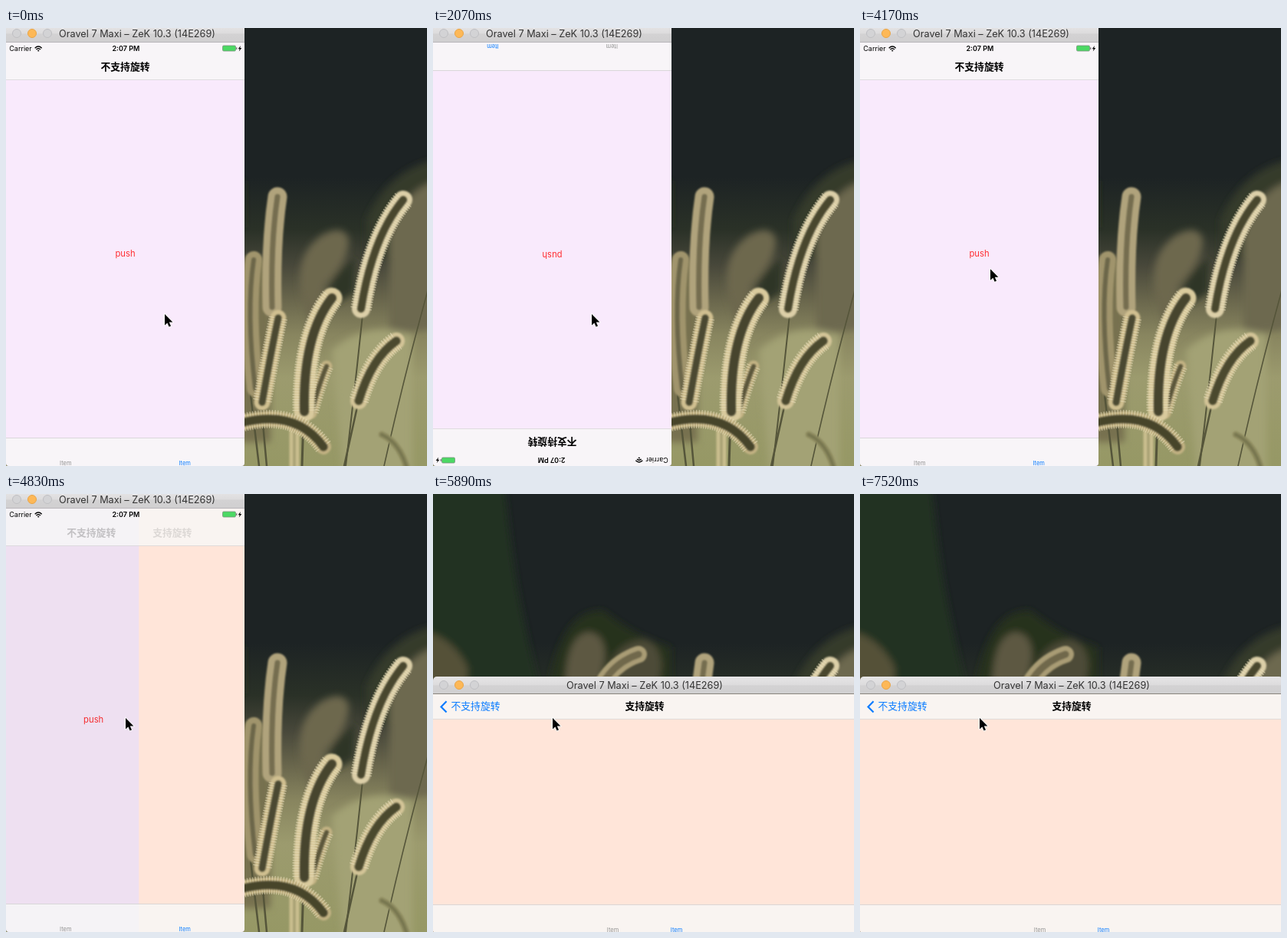
Animation of 549 by 571 pixels, one loop 8000 ms. Source, as an HTML page:

```html
<!DOCTYPE html>
<html lang="zh-CN">
<head>
<meta charset="utf-8">
<title>Rotation demo</title>
<style>
html, body { margin: 0; width: 100%; height: 100%; overflow: hidden; background: #1d2324; }
#stage { position: absolute; left: 0; top: 0; width: 549px; height: 571px; overflow: hidden;
  font-family: Inter, "Noto Sans CJK SC", "Noto Sans CJK", sans-serif; }
#stage * { position: absolute; box-sizing: border-box; white-space: nowrap; }
#wall, #cursor { left: 0; top: 0; overflow: visible; }
#wall *, #stage svg * { position: static; }
#win { left: 0; overflow: hidden; border-radius: 5px 5px 4px 4px; }
#bar { left: 0; top: 0; width: 100%; height: 23px; border-bottom: 1px solid;
  background: linear-gradient(#e6e5e6, #dddcdd 48%, #d3d2d3 54%, #d0cfd0); }
#bar i { top: 5px; width: 12px; height: 12px; border-radius: 50%; background: #d3d3d5; border: 1px solid #bfbfc2; }
#bar i.on { background: #fdb857; border-color: #e9a445; }
#name { top: 11.5px; font-size: 12.7px; color: #333; }
#screen { left: 0; top: 23px; overflow: hidden; background: #000; }
.view { left: 0; top: 0; width: 100%; height: 100%; }
#first { background: #f9eafc; }
#second { background: #ffe5d9; }
#shade { left: 0; top: 0; width: 100%; height: 100%; background: #000; }
.mid { transform: translate(-50%, -50%); line-height: 1.2; }
#push { left: 50%; top: 276px; font-size: 11.25px; color: #ff2f32; }
.chrome { left: 0; width: 100%; background: rgba(248, 248, 248, .8); }
#nav { top: 0; border-bottom: 1px solid rgba(0, 0, 0, .1); }
#tabs { bottom: 0; height: 37px; border-top: 1px solid rgba(0, 0, 0, .12); }
#tabs .mid { top: 31.5px; font-size: 7.5px; color: #929292; }
#tabs .sel { color: #0a7cff; }
.head { font-size: 12.8px; font-weight: 600; color: #000; }
#back { font-size: 12.8px; color: #0a7cff; }
#status { left: 0; top: 0; width: 100%; height: 15px; font-size: 9px; color: #000; }
</style>
</head>
<body>
<div id="stage">
  <svg id="wall" width="549" height="571" viewBox="0 0 549 571">
    <defs>
      <linearGradient id="dusk" x1="0" y1="0" x2="0" y2="571" gradientUnits="userSpaceOnUse">
        <stop offset=".34" stop-color="#1d2324"/>
        <stop offset=".46" stop-color="#2a3127"/>
        <stop offset=".54" stop-color="#47473a"/>
        <stop offset=".62" stop-color="#69664c"/>
        <stop offset=".7" stop-color="#88855f"/>
        <stop offset=".8" stop-color="#9c9b6e"/>
        <stop offset="1" stop-color="#969865"/>
      </linearGradient>
      <filter id="soft" filterUnits="userSpaceOnUse" x="-30" y="-30" width="610" height="632"><feGaussianBlur stdDeviation="5"/></filter>
      <filter id="fuzz" filterUnits="userSpaceOnUse" x="-30" y="-30" width="610" height="632"><feGaussianBlur stdDeviation="1.2"/></filter>
    </defs>
    <rect width="549" height="571" fill="url(#dusk)"/>
    <g id="blobs" filter="url(#soft)"></g>
    <g id="grass" fill="none" stroke-linecap="round"></g>
  </svg>

  <div id="win">
    <div id="bar">
      <i style="left:8px"></i><i class="on" style="left:28px"></i><i style="left:48px"></i>
      <span id="name" class="mid">Oravel 7 Maxi – ZeK 10.3 (14E269)</span>
    </div>
    <div id="screen">
      <div id="phone">
        <div id="first" class="view"><span id="push" class="mid">push</span><div id="shade"></div></div>
        <div id="second" class="view"></div>
        <div id="nav" class="chrome">
          <span id="title1" class="head mid">不支持旋转</span>
          <span id="title2" class="head mid">支持旋转</span>
          <svg id="chev" width="10" height="17" style="left:9px"><path d="M8.6 1.2L1.6 8.4l7 7.2" fill="none" stroke="#0a7cff" stroke-width="2.2"/></svg>
          <span id="back" class="mid">不支持旋转</span>
        </div>
        <div id="status">
          <span class="mid" style="left:19px;top:8px">Carrier</span>
          <svg width="11" height="9" style="left:37px;top:3.5px" fill="none" stroke="#000" stroke-width="1.3">
            <path d="M.7 3.2Q5.2-1.2 9.7 3.2M2.4 5Q5.2 2.4 8 5"/><path d="M3.8 6.3Q5.2 5.2 6.6 6.3L5.2 7.8Z" fill="#000" stroke="none"/>
          </svg>
          <b id="clock" class="mid" style="left:50.3%;top:8px;font-weight:600"></b>
          <svg width="28" height="10" style="left:281.5px;top:3px">
            <rect x=".5" y="1" width="17" height="7" rx="1.4" fill="#4cd964" stroke="#77917b" stroke-width=".8"/>
            <path d="M18.8 3.3v2.6" stroke="#555"/><path d="M24 1L20.7 5.2h2L21.8 8.5 25.3 4h-2.1Z" fill="#000"/>
          </svg>
        </div>
        <div id="tabs" class="chrome">
          <span id="tab1" class="mid">Item</span><span id="tab2" class="mid sel">Item</span>
        </div>
      </div>
    </div>
  </div>

  <svg id="cursor" width="14" height="20">
    <path d="M0 0V14.5L3.4 11.4 5.6 16.6 8 15.6 5.8 10.6H10.4Z" fill="#000" stroke="#fff" stroke-width="1.4" paint-order="stroke"/>
  </svg>
</div>

<script>
const $ = id => document.getElementById(id);
const NS = 'http://www.w3.org/2000/svg';
const SHORT = 311, LONG = 552, LOOP = 8000;

function draw(parent, d, attrs) {
  const p = document.createElementNS(NS, 'path');
  p.setAttribute('d', d);
  for (const k in attrs) p.setAttribute(k, attrs[k]);
  $(parent).append(p);
}

// Out-of-focus background
[
  ['M-20-20H92Q100 60 108 110T140 260H-20Z', '#243021'],
  ['M150 260Q165 150 222 152Q262 185 310 200V260Z', '#28321f'],
  ['M172 260Q172 182 204 180Q226 184 224 215L215 260Z', '#5d5942'],
  ['M220 260Q230 190 278 190Q310 205 290 260Z', '#4d4b37'],
  ['M-20 178Q22 182 45 225V260H-20Z', '#545139'],
  ['M470 250Q500 180 570 170V300H470Z', '#343a2a'],
  ['M500 270Q520 205 570 198V390L500 400Z', '#6d6950'],
  ['M385 350Q375 295 412 270Q440 255 447 275Q448 305 415 335L400 400Z', '#6d684e'],
  ['M418 345Q430 315 455 300V345L430 360Z', '#2d3526'],
  ['M300 300H345V540H300Z', '#77714f'],
  ['M425 420Q470 380 530 400V590H440Z', '#a3a274']
].forEach(([d, fill]) => draw('blobs', d, { fill }));

// Stems
[
  ['M465 374Q455 470 443 571', 2], ['M458 494L441 571', 2.5], ['M552 335Q520 450 493 571', 1.6],
  ['M388 508L386 571', 3], ['M333 494L340 571', 2.5], ['M318 470L330 571', 2.5]
].forEach(([d, w]) => draw('grass', d, { stroke: '#55553a', 'stroke-width': w }));

// Seed heads: path, full width, core width, rim, core, sharp bristles
[
  ['M268 209Q238 219 222 246', 22, 9, '#a99c74', '#6f684b', 0],
  ['M354 220Q345 280 347 364', 25, 7, '#b0a37b', '#746d50', 0],
  ['M323 302Q313 370 325 470', 22, 6, '#a0946c', '#6c664a', 0],
  ['M376 515L376 575', 13, 3, '#c9bd8e', '#a39d70', 0],
  ['M490 530Q512 540 522 571', 9, 4, '#8f8c61', '#777650', 0],
  ['M418 441Q409 462 398 502', 17, 6, '#c2b283', '#5b573b', 1],
  ['M355 378Q346 420 334 488', 23, 9, '#d0bf90', '#4b4931', 1],
  ['M518 224Q478 272 463 366', 26, 10, '#dccfa8', '#49472f', 1],
  ['M425 352Q387 400 389 500', 29, 12, '#d9ca9d', '#47452d', 1],
  ['M509 408Q477 430 460 486', 24, 11, '#d3c497', '#4b482f', 1],
  ['M306 515Q378 496 414 546', 22, 11, '#c3b283', '#46442c', 1]
].forEach(([d, w, core, rim, mid, sharp]) => {
  draw('grass', d, { stroke: rim, 'stroke-width': w - 2 * sharp, filter: 'url(#fuzz)' });
  if (sharp) draw('grass', d, { stroke: '#eadfbd', 'stroke-width': w + 2, 'stroke-dasharray': '1.1 2.3', 'stroke-linecap': 'butt', opacity: .6 });
  draw('grass', d, { stroke: mid, 'stroke-width': core, filter: 'url(#fuzz)' });
});

const clamp = x => Math.max(0, Math.min(1, x));
const part = (t, a, b) => clamp((t - a) / (b - a));
const mix = (a, b, k) => a + (b - a) * k;
const inOut = k => (1 - Math.cos(Math.PI * k)) / 2;

// Window turns: start, landscape window, content angle, layout from, layout to, settle end
const turns = [
  [0, 0, 0, 0, 0], [1260, 1, 90, 0, 0], [2070, 0, 180, 0, 0], [2880, 1, 270, 0, 0], [3510, 0, 0, 0, 0],
  [5470, 1, 90, 0, 1, 5890], [6360, 0, 90, 1, 0, 6740], [7160, 1, 90, 0, 1, 7520]
];

function place(el, x, y, alpha = 1) {
  el.style.left = x + 'px';
  el.style.top = y + 'px';
  el.style.opacity = alpha;
}

function size(el, w, h) {
  el.style.width = w + 'px';
  el.style.height = h + 'px';
}

function render(t) {
  const [start, wide, angle, from, to, end] = turns.filter(r => r[0] <= t).pop();
  const k = end ? inOut(part(t, start + 40, end)) : 0;
  const p = mix(from, to, k);
  const rot = end ? angle * (1 - k) : angle;

  // Window
  const w = wide ? LONG : SHORT, h = wide ? SHORT : LONG;
  $('win').style.top = (wide ? 238 : -4) + 'px';
  size($('win'), w, h + 23);
  size($('screen'), w, h);
  $('bar').style.borderColor = wide ? '#88847c' : '#b9b6ba';
  $('name').style.left = (wide ? 276 : 171) + 'px';

  // Phone layout
  const pw = mix(SHORT, LONG, p), ph = mix(LONG, SHORT, p);
  size($('phone'), pw, ph);
  place($('phone'), (w - pw) / 2, (h - ph) / 2);
  $('phone').style.transform = `rotate(${rot}deg)`;
  $('nav').style.height = mix(49, 32.7, p) + 'px';
  $('status').style.opacity = clamp(1 - p * 2);
  $('clock').textContent = t < 6360 ? '2:07 PM' : '2:08 PM';
  const gap = mix(77.7, 41.5, p);
  $('tab1').style.left = pw / 2 - gap + 'px';
  $('tab2').style.left = pw / 2 + gap + 'px';

  // Navigation push
  const u = part(t, 4690, 5180);
  const q = u < .15 ? u * u * 6.6 : 1 - .8515 * Math.pow((1 - u) / .85, 2.4);
  $('first').style.transform = `translateX(${-30 * q}%)`;
  $('second').style.transform = `translateX(${100 * (1 - q)}%)`;
  $('shade').style.opacity = .1 * q;
  $('push').style.opacity = t > 4600 && t < 4720 ? .3 : 1;
  const y = mix(31.5, 16.3, p), c = pw / 2;
  place($('title1'), mix(c, 55.5, q), y, clamp(1 - q * 1.8));
  place($('back'), mix(c, 55.5, q), y, clamp(q * 2 - 1));
  place($('title2'), c + 110 * (1 - q), y, clamp(q * 1.6 - .6));
  place($('chev'), 9, y - 8.2, clamp(q * 2 - 1));

  // Pointer
  const m = 1 - Math.pow(1 - part(t, 3940, 4600), 3);
  $('cursor').style.transform = `translate(${mix(207, 156, m)}px, ${mix(373, 292, m)}px)`;
}

const t0 = performance.now();
function tick() {
  render((performance.now() - t0) % LOOP);
  requestAnimationFrame(tick);
}
tick();
</script>
</body>
</html>
```
